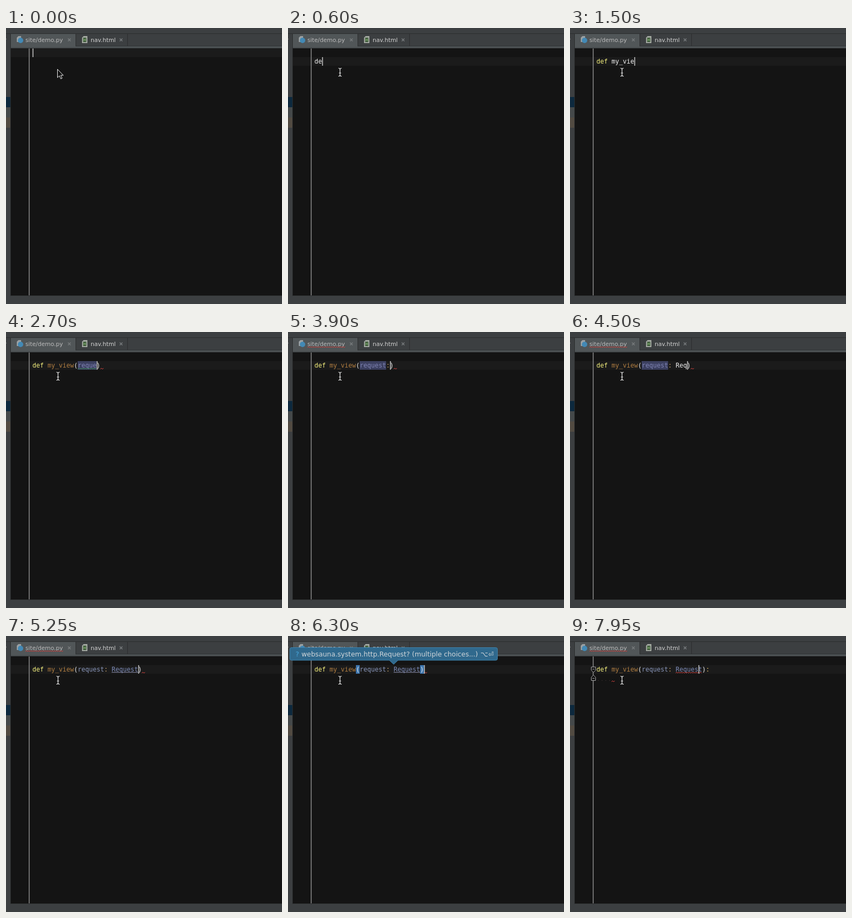
An HTML page for the animation above (8000 ms loop, 512 by 512 pixels).

```html
<!DOCTYPE html>
<html lang="en">
<head>
<meta charset="utf-8">
<title>Typing a view function</title>
<style>
  html, body { margin: 0; width: 100%; height: 100%; overflow: hidden; background: #141414; }
  svg { display: block; width: 100vw; height: 100vh; }
  text { white-space: pre; }
  .ui { font: 10.7px "DejaVu Sans", sans-serif; fill: #bbb; }
  .code { font: 11.63px "DejaVu Sans Mono", monospace; }
  .hint { font: 12.35px "DejaVu Sans", sans-serif; fill: #d0d6da; }
  .wave { fill: none; stroke: #c9403c; stroke-width: 1; }
  .close { stroke: #777b7d; stroke-width: 1.5; }
  .fold { fill: #141414; stroke: #a5a5a5; }
</style>
</head>
<body>
<svg viewBox="0 0 512 512">
  <rect width="512" height="512" fill="#141414"/>

  <!-- Editor -->
  <rect id="row" x="9" width="503" height="16" fill="#1b1b1b"/>
  <path d="M43 38V496" stroke="#858585" stroke-width="1.6"/>
  <g id="marks"></g>
  <text id="line" class="code" x="49" y="66"></text>
  <path id="typo" fill="none" stroke="#3c8a55"/>
  <path id="usage" d="M196 67.5H245" stroke="#8284a0"/>
  <path id="unresolved" class="wave"/>
  <path id="expected" class="wave"/>
  <path id="indent" d="M52 82.5h1m6 0h1m6 0h1m6 0h1" stroke="#4a3b3b"/>
  <g id="folds" class="fold">
    <path d="M39.5 57.5h8v6l-4 4-4-4zM41.5 61.5h4"/>
    <path d="M39.5 82.5h8v-6l-4-4-4 4zM41.5 78.5h4"/>
  </g>
  <rect id="caret" width="1.5" height="16" fill="#c8c8c8"/>
  <rect id="popup" x="176" y="70" width="340" height="168" fill="#3c3f41"/>

  <!-- Window frame -->
  <path d="M0 0H512V38H9V496H512V512H0Z" fill="#3c3f41"/>
  <rect y="128" width="8" height="19" fill="#0d293e"/>
  <rect y="147" width="8" height="19" fill="#45494a"/>
  <rect y="166" width="8" height="19" fill="#524b42"/>
  <path d="M8.5 11V496M0 10.5H512M8 496.5H512" stroke="#2b2d2e"/>
  <rect x="9" y="33" width="503" height="5" fill="#4d5254"/>
  <path d="M129 33.5H512M9 37.5H512" stroke="#303335"/>
  <rect x="9" y="11" width="120" height="24" fill="#515658"/>
  <path d="M129.5 11V33M225.5 11V33" stroke="#2b2d2e"/>
  <path d="M0 20.5h1" stroke="#999"/>

  <!-- Tabs -->
  <path d="M20 18l3-3h5v11h-8z" fill="#9aa0a3"/>
  <circle cx="27" cy="23" r="5" fill="#4389b5"/>
  <text class="ui" x="36" y="26">site/demo.py</text>
  <path class="close" d="M115 19.500l5 5m0-5l-5 5"/>
  <path d="M141 18l3-3h7v13h-10z" fill="#a4aaa2"/>
  <path d="M143 18h6v8h-6z" fill="#30482f"/>
  <path d="M144.500 19v6M147.500 19v6M144.500 22h3" stroke="#8fbd7d"/>
  <text class="ui" x="157" y="26" style="fill:#d0d0d0">nav.html</text>
  <path class="close" d="M211 19.500l5 5m0-5l-5 5"/>
  <path id="tabError" class="wave"/>

  <!-- Import hint -->
  <g id="hint">
    <path d="M6 21.500H385.500q3 0 3 3V42q0 3-3 3H204l-8 7.500-8-7.500H6.500q-3 0-3-3V24.500q0-3 3-3z" fill="#30698d" stroke="#3d82ac"/>
    <text class="hint" x="14" y="38" style="fill:#48a6dc">?</text>
    <text class="hint" x="25" y="38">websauna.system.http.Request? (multiple choices...)</text>
    <text class="hint" x="357" y="38">⌥⏎</text>
  </g>

  <!-- Pointers -->
  <path id="arrow" d="M95.500 76.500v15.500l3.600-3.300 2.500 5.600 2.500-1.100-2.500-5.400h4.700z" fill="#111" stroke="#f0f0f0"/>
  <g id="beam" fill="none">
    <path d="M93.500 74.500q3 0 3 2.500V87q0 2.500-3 2.500M99.500 74.500q-3 0-3 2.500M99.500 89.500q-3 0-3-2.500M94.500 83.500h4" stroke="#e8e8e8" stroke-width="1.2"/>
  </g>
</svg>
<script>
const $ = id => document.getElementById(id);
const LOOP = 8000, LEFT = 49, CELL = 7;
const SOURCE = 'def my_view(request: Request):';

// [time, number of characters typed]
const typing = [
  [0, 0], [450, 1], [600, 2], [750, 3], [900, 4], [1050, 5], [1200, 7],
  [1350, 9], [1500, 10], [1650, 11], [1800, 12], [1950, 13], [2100, 14],
  [2250, 16], [2400, 17], [3150, 19], [3900, 20], [4050, 21], [4200, 22],
  [4350, 23], [4500, 24], [4650, 26], [4800, 28], [5850, 29], [6450, 30]
];
// [time, row, column] once the caret is no longer at the end of the typing
const moves = [[6900, 2, 4], [7500, 1, 30], [7650, 1, 29], [7800, 1, 28], [7950, 1, 27]];

const latest = (list, t) => list.filter(item => item[0] <= t).pop();
const columnX = column => LEFT + CELL * column;
const show = (id, on) => { $(id).style.display = on ? '' : 'none'; };

function wave(x, end, y) {
  let d = `M${x} ${y}`;
  for (let i = 1; x + 2 * i <= end; i++) d += `l2 ${i % 2 ? -2 : 2}`;
  return d;
}

function colour(token, column, t) {
  if (token === 'def') return '#f2ee7c';
  if (t < 2700) return '#f0f0f0';
  if (token === 'my_view') return '#b07d40';
  if (token.startsWith('reque')) return t < 5250 ? '#7f83b3' : '#8794b8';
  if (token === 'Request' && t >= 5250) return '#7d8bb8';
  if (token === ':') return column < 25 ? '#bd9a65' : '#d6b060';
  return '#f0f0f0';
}

function paintLine(text, t) {
  let html = '';
  for (const match of text.matchAll(/def(?= |$)|my_view|request?|reque|Request|./g))
    html += `<tspan fill="${colour(match[0], match.index, t)}">${match[0]}</tspan>`;
  $('line').innerHTML = html;
}

function mark(column, length, fill) {
  return `<rect x="${columnX(column)}" y="54" width="${CELL * length}" height="16" fill="${fill}"/>`;
}

function paint(t) {
  const count = latest(typing, t)[1];
  const text = SOURCE.slice(0, count) + (count >= 12 && count < 29 ? ')' : '');
  const [, row, column] = latest(moves, t) || [0, t < 300 ? 0 : 1, count];
  const top = 38 + 16 * row;

  paintLine(text, t);
  $('row').setAttribute('y', top);
  $('caret').setAttribute('x', columnX(column) + .3);
  $('caret').setAttribute('y', top);

  let marks = '';
  if (t >= 2700 && t < 5250) marks += mark(12, t < 3450 ? 5 : 7, '#3c4060');
  if (row === 1 && column === 29) marks += mark(11, 1, '#3d75ad') + mark(28, 1, '#3d75ad');
  $('marks').innerHTML = marks;

  const end = columnX(text.length);
  $('expected').setAttribute('d', t < 6900 ? wave(end, end + 6, 69) : wave(77, 83, 85));
  show('expected', t >= 2700);
  show('typo', t >= 2700 && t < 3450);
  show('tabError', t >= 2850);
  show('popup', t >= 4200 && t < 4350);
  show('usage', t >= 5250 && t < 7200);
  show('unresolved', t >= 7200);
  show('indent', t >= 6900);
  show('folds', t >= 7200);
  show('hint', t >= 6150 && t < 6450);
  $('hint').style.opacity = t < 6300 ? .65 : 1;
  show('arrow', t < 300);
  show('beam', t >= 300);
}

$('typo').setAttribute('d', wave(133, 168, 69));
$('unresolved').setAttribute('d', wave(196, 245, 69));
$('tabError').setAttribute('d', wave(36, 107, 29));

let last = -1;
function tick() {
  const t = Math.floor(performance.now() % LOOP / 150) * 150;
  if (t !== last) paint(last = t);
  requestAnimationFrame(tick);
}
tick();
</script>
</body>
</html>
```
